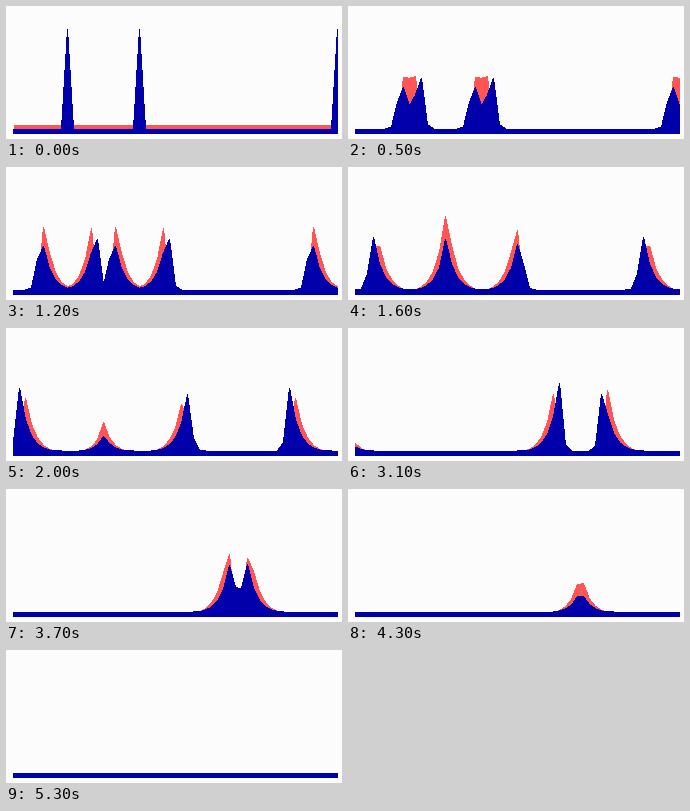
Animation of 336 by 133 pixels, one loop 6.1 s. Source, as a matplotlib script:

```python
import matplotlib.pyplot as plt
import numpy as np
from matplotlib.animation import FuncAnimation
from matplotlib.patches import Polygon, Rectangle

WIDTH, HEIGHT, DPI = 336, 133, 100
CELLS, SPACING, LEFT, BASE = 55, 6, 7, 123
LAST_STEP, LOOP_FRAMES, INTERVAL = 53, 61, 100
BLUE, RED, PAPER = "#0000aa", "#ff5555", "#fcfcfc"
SEEDS = [9, 21, 54]
MIRROR_SEED = -10  # reflection of the first seed in the closed left edge

cells = np.arange(CELLS)
xs = LEFT + SPACING * cells + 0.5

# Each seed sends a front both ways; a cell fires when the first one arrives.
offsets = cells - np.array([MIRROR_SEED] + SEEDS)[:, None]
distances = np.abs(offsets)
travel = np.where(offsets >= 0, 0.6 + 2.34 * distances, 1.3 + 2.3 * distances)
first, second = np.sort(travel, axis=0)[:2]
nearest = distances.min(axis=0)

# Seeds respond strongly, fresh fronts weakly, meeting fronts add up.
strength = np.where(nearest == 0, 1.65, 1 - 0.4 * np.exp(-nearest))
strength *= 1 + 0.25 * np.exp(-((second - first) / 2) ** 2)


def activator(t):
    rise = np.exp(np.minimum(t, 0))
    fall = 0.74 ** np.maximum(t, 0)
    return np.maximum(70 * rise * fall - 1, 0)


def inhibitor(t):
    s = np.clip((t + 0.4) / 2.2, 0, 1)
    rise = s * s * (3 - 2 * s)
    fall = 0.76 ** np.maximum(t - 1.8, 0)
    return np.maximum(69 * fall - 3, 0) * rise


def profiles(step):
    if step == 0:
        return np.where(nearest == 0, 100.0, 0.0), np.full(CELLS, 4.0)
    t = step - first
    blue = np.sqrt(strength) * activator(t)
    red = np.maximum(strength * inhibitor(t), 4 - 2 * step)
    return blue, red


def outline(heights):
    top = np.column_stack([xs, BASE - heights])
    return np.vstack([[xs[0], BASE + 2], top, [xs[-1], BASE + 2]])


fig = plt.figure(figsize=(WIDTH / DPI, HEIGHT / DPI), dpi=DPI, facecolor=PAPER)
ax = fig.add_axes([0, 0, 1, 1])
ax.set_xlim(0, WIDTH)
ax.set_ylim(HEIGHT, 0)
ax.axis("off")

red_area, blue_area = (
    ax.add_patch(Polygon(outline(np.zeros(CELLS)), facecolor=color,
                         linewidth=0, antialiased=False, zorder=order))
    for order, color in enumerate([RED, BLUE], start=1)
)
ax.add_patch(Rectangle((LEFT, BASE), 325, 5, facecolor=BLUE, linewidth=0,
                       antialiased=False, zorder=3))


def update(frame):
    blue, red = profiles(min(frame, LAST_STEP))
    blue_area.set_xy(outline(blue))
    red_area.set_xy(outline(red))
    return red_area, blue_area


anim = FuncAnimation(fig, update, frames=LOOP_FRAMES, interval=INTERVAL,
                     repeat=True, repeat_delay=0, blit=False)
plt.show()
```
